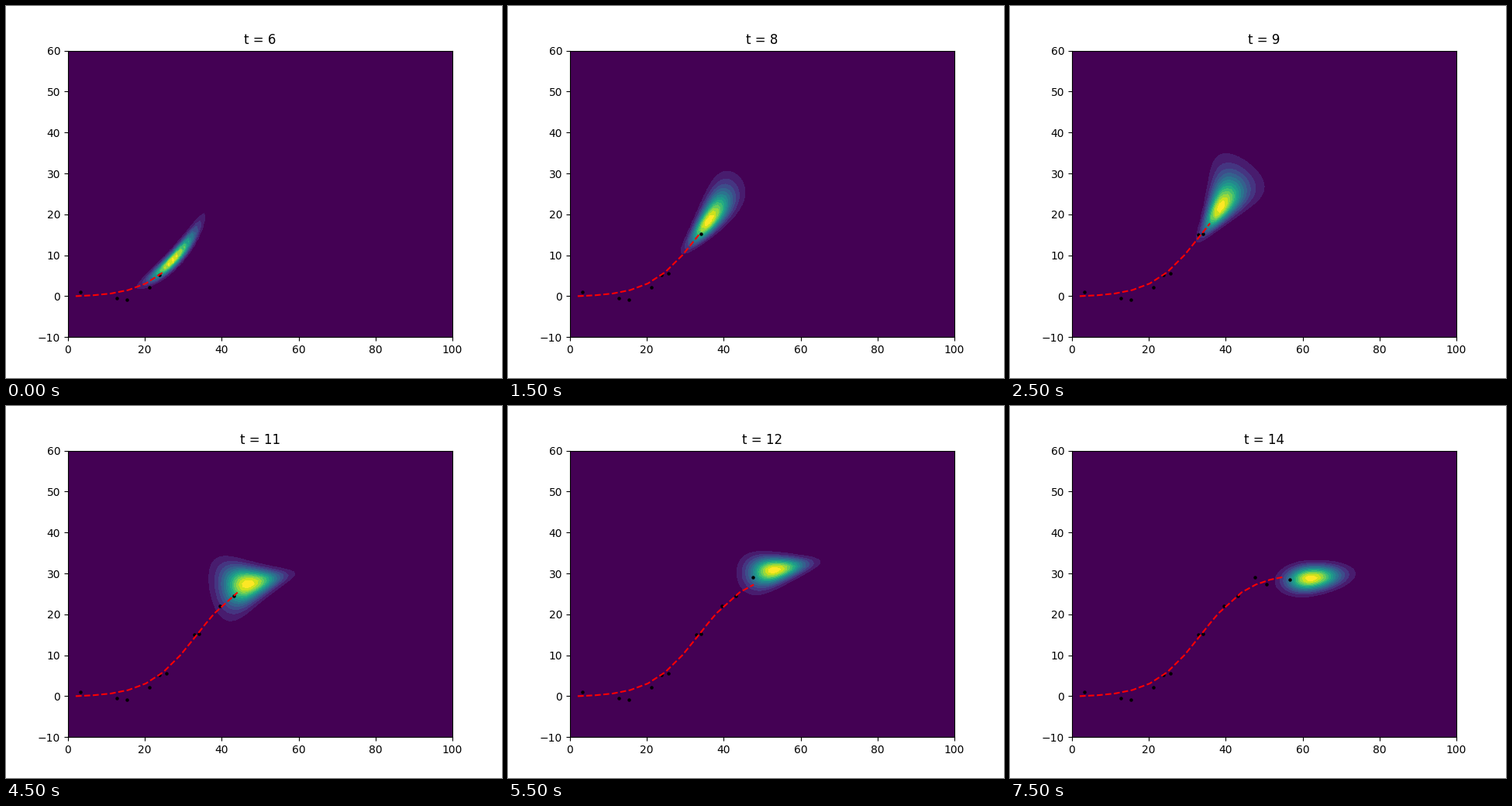
A matplotlib script for the animation above (8000 ms loop, 640 px wide and 480 px high).

```python
import numpy as np
import matplotlib.pyplot as plt
from matplotlib.animation import FuncAnimation

FIRST, LAST = 6, 14
BANDS = 14
COLORS = plt.get_cmap("viridis")(np.linspace(0, 1, BANDS))
X, Y = np.meshgrid(np.linspace(0, 100, 100), np.linspace(-10, 60, 100))

# Key times and places of the density peak
PEAK_T = [6, 8, 10, 11, 12, 14]
PEAK_X = [27, 36, 41, 46.7, 53, 62]
PEAK_Y = [8.6, 18.3, 24.8, 27.4, 30.8, 28.8]

# Noisy measurements, one per step
DOTS = np.array([
    (3.3, 1.1), (12.8, -0.4), (15.3, -0.8), (21.2, 2.1), (23.8, 5.1),
    (25.6, 5.6), (34, 15.2), (32.9, 15), (39.6, 22.1), (43.2, 24.5),
    (47.6, 29), (50.6, 27.4), (56.6, 28.5)])


def trail(t):
    """Estimated track up to step t: an S-shaped climb."""
    steps = np.arange(1, t + 1)
    x = np.interp(steps, [1, 6, 8, 10, 11, 14],
                  [2, 24.8, 33.7, 38.1, 44.1, 55.2])
    return x, 30.3 / (1 + np.exp((33.5 - x) / 6.3)) - 0.2


def density(t):
    """Bell that is longer ahead than behind and widens or tapers ahead."""
    dx = X - np.interp(t, PEAK_T, PEAK_X)
    dy = Y - np.interp(t, PEAK_T, PEAK_Y)
    turn = [6, 10, 11, 14]
    angle = np.radians(np.interp(t, turn, [44, 60, 12, 6]))
    taper = np.interp(t, turn, [0, 0.12, -0.08, -0.01])
    width = np.interp(t, [6, 11, 12, 14], [0.9, 2.7, 2.0, 1.9])
    back = np.interp(t, [FIRST, LAST], [4.8, 4.0])
    bend = 0.003 * max(10 - t, 0)

    u = dx * np.cos(angle) + dy * np.sin(angle)
    v = dy * np.cos(angle) - dx * np.sin(angle) - bend * u ** 2
    length = np.where(u > 0, 1.28 * back, back)
    z = np.exp(-(u / length) ** 2 / 2
               - (v / (width * np.exp(taper * u))) ** 2 / 2)
    return z / z.max() * 0.98


fig, ax = plt.subplots(figsize=(6.4, 4.8), dpi=100)


def draw(frame):
    t = FIRST + (frame + 1) // 2
    ax.clear()
    ax.set_facecolor(COLORS[0])
    ax.contourf(X, Y, density(t), levels=np.linspace(0, 1, BANDS + 1),
                colors=COLORS)
    ax.plot(*DOTS[:t - 1].T, "ko", markersize=2.2)
    ax.plot(*trail(t), "r--")
    ax.set_xlim(0, 100)
    ax.set_ylim(-10, 60)
    ax.set_title(f"t = {t}")


anim = FuncAnimation(fig, draw, frames=16, interval=500, repeat=True,
                     repeat_delay=0)
plt.show()
```
